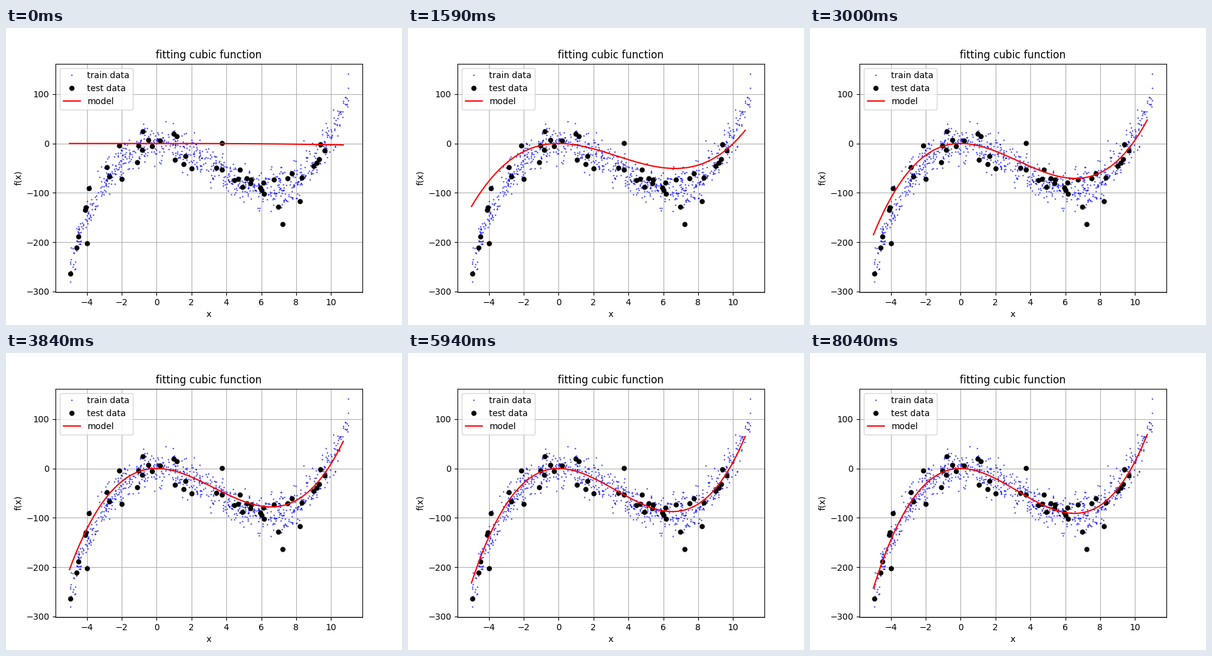
Write a matplotlib script that moves like this. It is 640 px wide and 480 px high and loops after 8.13 s.

```python
import numpy as np
import matplotlib.pyplot as plt
from matplotlib.animation import FuncAnimation

STEP_MS = 30
FRAMES = 271
LAST_STEP = 268  # the fitted curve rests for the final frames

A, B = 0.674, -6.59  # coefficients of x^3 and x^2 the fit converges to


def cubic(x, a, b):
    return a * x**3 + b * x**2


def weights(t):
    """Fit coefficients after t seconds: one slow and one fast decaying mode."""
    slow, fast = np.exp(-0.452 * t), np.exp(-8 * t)
    return A - 0.6851 * slow + 0.0095 * fast, B + 6.534 * slow + 0.0473 * fast


def make_train(n=800):
    rng = np.random.default_rng(7)
    x = rng.uniform(-5, 11, n)
    y = cubic(x, A, B) + np.clip(rng.normal(0, 18, n), -46, 46)
    y = np.clip(y, -278, 112)
    outliers = [(11, 141), (10.97, 112), (-4.96, -280), (8.43, 6), (5.86, -136)]
    ox, oy = np.transpose(outliers)
    return np.r_[x, ox], np.r_[y, oy]


test = np.array([
    (-4.95, -263.7), (-4.6, -211), (-4.49, -188), (-4.1, -134.6), (-4.05, -130),
    (-3.99, -202), (-3.9, -90.7), (-2.84, -48), (-2.7, -67), (-2.16, -4.2),
    (-2.02, -72), (-1.12, -38), (-1.05, -4.8), (-0.85, -13), (-0.78, 24.6),
    (-0.46, 7.7), (-0.28, -5.5), (0.18, 5.8), (0.96, 19.6), (1.17, 14.6),
    (1.06, -33), (1.53, -42), (1.65, -25.5), (1.99, -50.6), (3.41, -49.3),
    (3.73, -53.7), (3.76, 0.8), (4.44, -74.4), (4.65, -71.3), (4.76, -53),
    (4.9, -88.2), (5.18, -70.6), (5.39, -80.7), (5.43, -73.2), (5.93, -90),
    (6.03, -94.5), (6.14, -79.4), (6.17, -102), (6.71, -73.2), (6.96, -128.3),
    (7.24, -163.4), (7.52, -70.6), (7.77, -60), (8.2, -117), (8.34, -69.4),
    (9.01, -45.6), (9.16, -39.3), (9.33, -31.8), (9.4, -1.7), (9.62, -14.2),
])

fig, ax = plt.subplots(figsize=(6.4, 4.8), dpi=100)
ax.plot(*make_train(), "b.", markersize=1, label="train data")
ax.plot(*test.T, "ko", markersize=5, label="test data")
xs = np.linspace(-5, 10.7, 158)
model, = ax.plot(xs, cubic(xs, *weights(0)), "r-", label="model")

ax.set(xlim=(-5.8, 11.8), ylim=(-301.6, 161.8), xlabel="x", ylabel="f(x)",
       title="fitting cubic function")
ax.grid(True)
ax.legend(loc="upper left")


def update(i):
    t = min(i, LAST_STEP) * STEP_MS / 1000
    model.set_ydata(cubic(xs, *weights(t)))
    return model,


anim = FuncAnimation(fig, update, frames=FRAMES, interval=STEP_MS,
                     repeat=True, repeat_delay=0)
plt.show()
```
